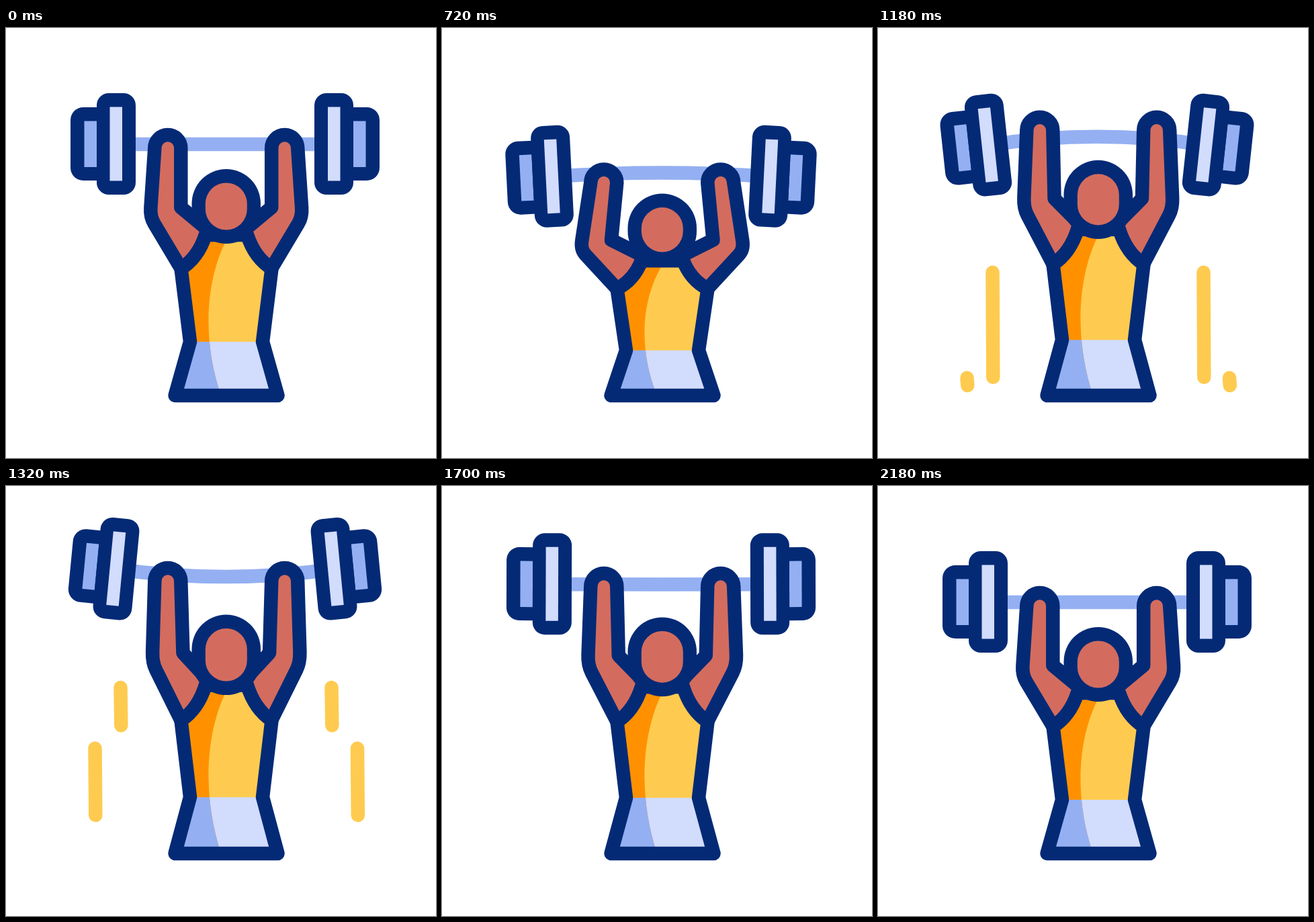
An HTML page with a canvas that plays this animation: 640x640 px, repeating every 2340 ms.

```html
<!DOCTYPE html>
<html lang="en">
<head>
<meta charset="utf-8">
<title>Weightlifter</title>
<style>
  html, body { margin: 0; height: 100%; overflow: hidden; background: #fff; }
  canvas { display: block; width: 100vw; height: 100vh; }
</style>
</head>
<body>
<canvas width="640" height="640"></canvas>
<script>
const ctx = document.querySelector('canvas').getContext('2d');
const LOOP = 2340, STEP = 20, BASE = 547, LINE = 20.5;
const NAVY = '#042a76', SKIN = '#d36c5e', BLUE = '#94b0f2', PALE = '#d2dcfc',
      YELLOW = '#fecb50', ORANGE = '#ff9100';

function ease(t, from, to) {
  const u = Math.min(Math.max((t - from) / (to - from), 0), 1);
  return u * u * u * (10 - 15 * u + 6 * u * u);
}

// Eases from one turning point [time, value] to the next, starting at zero
const track = (start, ...turns) => t => {
  let from = start, last = 0, value = 0;
  for (const [time, goal] of turns) {
    value += (goal - last) * ease(t, from, time);
    [from, last] = [time, goal];
  }
  return value;
};

// Squat, push, dip, second push, settle; the bar trails and its ends whip
const handAt = track(200, [900, 58], [1282, -38], [1550, 9.5], [1770, -38], [2020, 4], [2180, 0]);
const barAt = track(200, [960, 52], [1320, -38], [1565, 8], [1776, -38], [2040, 2], [2180, 0]);
const droopAt = track(420, [1130, 8], [1310, -5.5], [1580, 4], [1830, -5], [2010, 1.5], [2180, 0]);

function stroke(path, color = NAVY) {
  ctx.strokeStyle = color;
  ctx.lineWidth = LINE;
  ctx.stroke(new Path2D(path));
}

function fill(path, color) {
  ctx.fillStyle = color;
  ctx.fill(new Path2D(path));
}

function box(x, y, w, h, color, r = 0) {
  ctx.fillStyle = color;
  ctx.beginPath();
  ctx.roundRect(x, y, w, h, r);
  ctx.fill();
}

// Draws a left-hand part and its mirror image
function both(width, draw) {
  draw();
  ctx.save();
  ctx.translate(width, 0);
  ctx.scale(-1, 1);
  draw();
  ctx.restore();
}

// A pair of lines that shoot up from the floor, the tail following the tip
function speedLines(left, right, length, t, start, tailStart) {
  const top = 532 - length * ease(t, start, start + 200);
  const tail = 532 - length * ease(t, tailStart, tailStart + 310);
  if (tail - top < 0.5) return;
  for (const x of [left, right]) stroke(`M${x} ${top}L${x + 0.8} ${tail}`, YELLOW);
}

function barbell(bar, droop) {
  const mid = 173 + bar, end = mid + 2.05 * droop;
  stroke(`M164 ${end}Q326 ${2 * mid - end} 488 ${end}`, BLUE);
  both(652, () => {
    ctx.save();
    ctx.translate(164, end - 0.5);
    ctx.rotate(-droop * Math.PI / 180);
    box(-68, -54.5, 60, 109, NAVY, 19);
    box(-47.5, -34, 18.5, 68.5, BLUE);
    box(-29, -75.5, 58, 151, NAVY, 18);
    box(-9.5, -55, 18.5, 110, PALE);
    ctx.restore();
  });
}

function arm(hand, Y) {
  const h = 178.5 + hand, shoulder = Y(358);
  const bend = 0.18 * hand + 1.3 * (shoulder - 358), shift = -0.17 * bend;
  const ex = 214.5 + shift, ey = 281 + bend;
  const near = (x, y) => `${ex + 0.13 * (x - ex)} ${ey + 0.13 * (y - ey)}`;
  const path = `M221.3 ${h}A19.5 19.5 0 0 1 260.3 ${h}`
    + `L${260.3 + shift} ${267 + bend}L300 ${Y(300)}L297 ${Y(308)}`
    + `Q286 ${Y(342)} 260.5 ${shoulder}L${near(260.5, shoulder)}`
    + `Q${ex} ${ey} ${near(221.3, h)}Z`;
  fill(path, SKIN);
  stroke(path);
}

function torso(Y) {
  const waist = Y(467), rest = 640 - waist;
  const path = `M297 ${Y(308)}Q286 ${Y(342)} 260.5 ${Y(358)}L274 ${waist}L251.5 ${BASE}`
    + `H404.5L382 ${waist}L395.5 ${Y(358)}Q370 ${Y(342)} 359 ${Y(308)}Z`;
  ctx.save();
  ctx.clip(new Path2D(path));
  box(200, 200, 300, 400, YELLOW);
  box(200, waist, 300, rest, PALE);
  ctx.clip(new Path2D(
    `M200 ${Y(312)}H330C296 ${Y(375)} 292 ${Y(465)} 320 ${BASE}H200Z`));
  box(200, 200, 300, 400, ORANGE);
  box(200, waist, 300, rest, BLUE);
  ctx.restore();
  stroke(path);
}

function head(top, bottom) {
  box(276.5, top, 102.5, bottom - top, NAVY, 51.25);
  box(296.8, top + 20.5, 62, bottom - top - 41, SKIN, 31);
}

function draw(now) {
  const t = Math.floor(now % LOOP / STEP) * STEP;
  const hand = handAt(t);
  // The body gives way fully in a squat but stretches less in a push
  const sink = hand > 0 ? hand : 0.42 * hand;
  const Y = y => BASE - (BASE - y) * (1 - 0.0031 * sink);
  ctx.fillStyle = '#fff';
  ctx.fillRect(0, 0, 640, 640);
  ctx.lineCap = ctx.lineJoin = 'round';
  speedLines(170.5, 484.5, 232, t, 1055, 1120);
  speedLines(132.5, 523, 142, t, 1135, 1200);
  barbell(barAt(t), droopAt(t));
  both(655.5, () => arm(hand, Y));
  torso(Y);
  head(210 + 0.35 * hand + 0.36 * sink, 321 + 0.64 * sink);
}

const start = performance.now();
function frame() {
  draw(performance.now() - start);
  requestAnimationFrame(frame);
}
frame();
</script>
</body>
</html>
```
